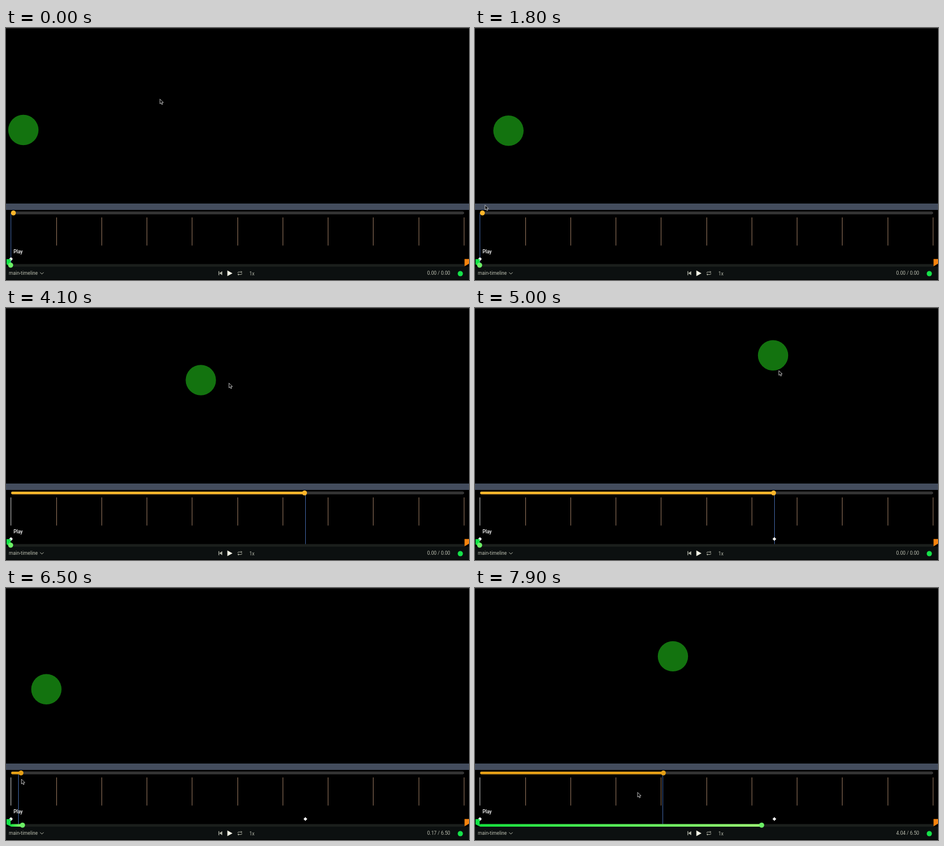
An HTML page for the animation above (8 s loop, 800 by 435 pixels).

```html
<!DOCTYPE html>
<html lang="en">
<head>
<meta charset="utf-8">
<title>Timeline scrubbing</title>
<style>
  html, body { margin: 0; width: 100%; height: 100%; overflow: hidden; background: #000; }
  svg { display: block; width: 800px; height: 435px; }
  text { font: 8.25px Roboto, Inter, sans-serif; fill: #b9bcae; }
  .line { fill: none; stroke: #b9bcae; }
</style>
</head>
<body>
<svg viewBox="0 0 800 435">
  <defs>
    <linearGradient id="progress">
      <stop offset="0" stop-color="#14e03c"/>
      <stop offset="1" stop-color="#9cfa74"/>
    </linearGradient>
    <path id="diamond" d="M0-3.2L3.2 0 0 3.2-3.2 0z" fill="#fff"/>
  </defs>
  <rect width="800" height="1" fill="#242424"/>
  <circle id="ball" r="26.2" fill="#13730f"/>

  <rect y="303" width="800" height="11" fill="#434c5d"/>
  <rect x="9" y="317.4" width="782" height="3.6" rx="1.8" fill="#2f2f2f" stroke="#575757" stroke-width=".7"/>
  <g id="ticks"></g>
  <rect id="playhead" y="320" width="1" height="88" fill="#3f62a0"/>
  <rect id="fill" x="9" y="317" height="4.4" rx="2"/>
  <circle id="thumb" cy="319.2" r="4.2"/>

  <text x="13" y="388.7" style="fill:#fff;font-weight:500">Play</text>
  <rect y="412" width="800" height="22" fill="#0c1010"/>
  <rect x="8" y="407.5" width="784" height="4.5" fill="#1b1f1c"/>
  <use href="#diamond" x="8.6" y="398.8"/>
  <use id="key" href="#diamond" x="517.3" y="398.8"/>
  <path d="M1 399h7v12.4L1 408z" fill="#10e345"/>
  <path d="M792.3 398.7h7.7v8l-7.7 4.9z" fill="#f5830d"/>
  <rect id="bar" x="8" y="407.5" height="4.5" rx="1.5" fill="url(#progress)"/>
  <circle id="knob" cy="409.3" r="4.4" fill="#6cf066"/>

  <text x="5" y="426.4">main-timeline</text>
  <path class="line" d="M59 421.8l3 3 3-3"/>
  <path d="M367.2 419.8h1.2v7h-1.2zM373.6 419.8v7l-5-3.5z" fill="#b9bcae"/>
  <path d="M382.5 418.5l8.8 4.9-8.8 4.9z" fill="#fbfbe9"/>
  <path class="line" stroke-width=".9" d="M400.6 423.2v-.7q0-1.3 1.3-1.3h5.6m-1.5-1.6l1.6 1.6-1.6 1.6M407.6 423.5v.7q0 1.3-1.3 1.3h-5.6m1.5 1.6l-1.6-1.6 1.6-1.6"/>
  <text x="420.5" y="426.6">1x</text>
  <text id="clock" x="767.5" y="426.4" text-anchor="end"></text>
  <circle cx="785" cy="424" r="4.5" fill="#16e24a"/>
  <path id="cursor" d="M0 0v8.2l1.9-1.7 1.3 3 1.5-.7-1.3-2.8h2.6z" fill="#000" stroke="#ddd" stroke-width=".8"/>
</svg>
<script>
const $ = id => document.getElementById(id);
const set = (id, attrs) => {
  for (const name in attrs) $(id).setAttribute(name, attrs[name]);
};

const LOOP = 8000, STEP = 100, SECOND = 78.27, DURATION = 6.5;
const KEY_ADDED = 5000, SCRUB_BACK = 5800;

// Eased 0 to 1 between two times
const ramp = (t, from, to) => {
  const u = Math.min(1, Math.max(0, (t - from) / (to - from)));
  return u * u * (3 - 2 * u);
};

// Pointer moves: from ms, to ms, end x, end y
const moves = [
  [0, 400, 30, 178], [400, 1000, 60, 182],             // nudge the ball
  [1000, 1800, 17.3, 305.7], [1800, 2100, 13, 318],    // reach the slider
  [2300, 2900, 513, 350],                              // drag it right
  [2950, 3350, 60, 180], [3400, 4500, 525, 108],       // drag the ball
  [5100, 5700, 516.3, 320.5], [5800, 6500, 26.7, 330], // scrub back
  [6500, 7250, 525, 350], [7650, 8050, 168, 354]       // forth and back
];
function pointer(t) {
  let x = 266, y = 122.7;
  for (const [from, to, endX, endY] of moves) {
    const k = ramp(t, from, to);
    x += (endX - x) * k;
    y += (endY - y) * k;
  }
  return `translate(${x} ${y})`;
}

const scrubTime = t => DURATION * ramp(t, 2300, 2935)
  - 6.33 * (ramp(t, SCRUB_BACK, 6500) - ramp(t, 6500, 7300))
  - 4.92 * ramp(t, 7700, 8100);

for (let i = 0; i <= 10; i++) {
  $("ticks").innerHTML += `<rect x="${Math.round(8.3 + SECOND * i)}" y="327" width="1" height="48.5"
    fill="${i ? "#94755c" : "#c4c4c4"}"/>`;
}

function draw(t) {
  const scrub = scrubTime(t);
  const live = t > SCRUB_BACK;
  const time = live ? scrub : 0;
  const part = time / DURATION;

  // The ball is dragged on a slight curve, then tweens in a straight line
  const nudge = ramp(t, 400, 1000);
  const drag = ramp(t, 3400, 4620);
  set("ball", {
    cx: 30 + 27.8 * nudge + 457.2 * (live ? part : drag),
    cy: 176 + 1.2 * nudge - 95.4 * (live ? part : drag ** 1.2)
  });

  const dragging = live || (t > 2300 && t < 3000);
  const hovered = !live && t > 5500;
  const fill = dragging ? "#e59f16" : hovered ? "#ffc352" : "#fdb62b";
  const x = 12.8 + scrub * 77.4;
  set("fill", { width: scrub > 0 ? x - 9 : 0, fill });
  set("thumb", { cx: x, fill });
  set("playhead", { x: Math.floor(8.4 + scrub * SECOND) });

  set("bar", { width: 784 * part });
  set("knob", { cx: 8 + 784 * part });
  set("key", { visibility: t >= KEY_ADDED ? "visible" : "hidden" });
  $("clock").textContent = `${time.toFixed(2)} / ${(live ? DURATION : 0).toFixed(2)}`;
  set("cursor", { transform: pointer(t) });
}

const start = performance.now();
function frame() {
  const elapsed = (performance.now() - start) % LOOP;
  draw(Math.floor(elapsed / STEP) * STEP);
  requestAnimationFrame(frame);
}
frame();
</script>
</body>
</html>
```
